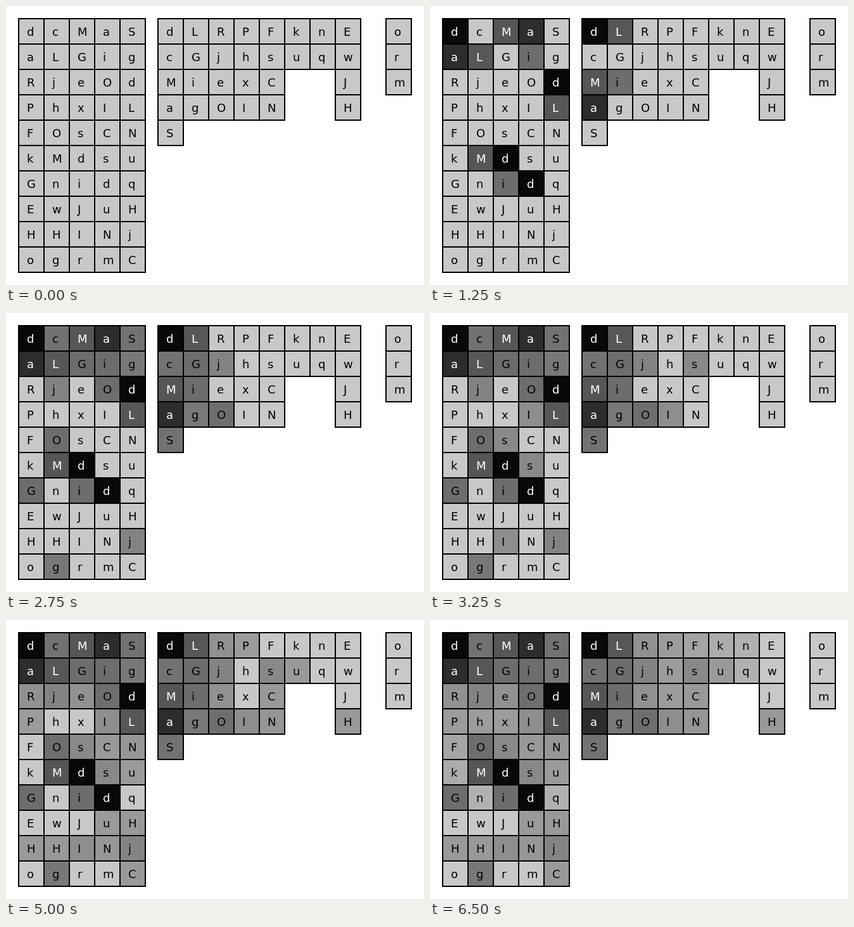
Animation, 660 px wide and 440 px high, one loop 8 s. Source, as an HTML page:

```html
<!DOCTYPE html>
<html lang="en">
<head>
<meta charset="utf-8">
<style>
  html, body { margin: 0; width: 100%; height: 100%; overflow: hidden; background: #fff; }
  svg { display: block; width: 660px; height: 440px; }
  rect { stroke: #000; stroke-width: 2; }
  text { font: 18px "DejaVu Sans", Verdana, sans-serif; }
</style>
</head>
<body>
<svg id="stage" viewBox="0 0 660 440"></svg>
<script>
const NS = 'http://www.w3.org/2000/svg';
const CELL = 40, STEP = 250, LOOP = 8000, BASE = 200;
const stage = document.getElementById('stage');

const rows = ['dcMaS', 'aLGig', 'RjeOd', 'PhxIL', 'FOsCN',
              'kMdsu', 'Gnidq', 'EwJuH', 'HHINj', 'ogrmC'];
const columns = ['dcMaS', 'LGig', 'RjeO', 'PhxI', 'FsCN', 'ku', 'nq', 'EwJH', '', 'orm'];
const order = 'daMLiGOScgjsIReNuHCPhxFkqn';

// Each row counts 0.8 times as much as the one above it.
const score = {};
rows.forEach((row, r) => {
  for (const ch of row) score[ch] = (score[ch] || 0) + 0.8 ** r;
});
const shade = ch => Math.max(0, Math.round(BASE - 86 * score[ch]));

function add(tag, attrs) {
  const el = document.createElementNS(NS, tag);
  for (const key in attrs) el.setAttribute(key, attrs[key]);
  return stage.appendChild(el);
}

const cells = [];
function addCell(ch, x, y) {
  const box = add('rect', { x, y, width: CELL, height: CELL });
  const label = add('text', { x: x + 13, y: y + 27 });
  label.textContent = ch;
  cells.push({ ch, box, label, rank: order.indexOf(ch) });
}

rows.forEach((row, r) => [...row].forEach((ch, c) => addCell(ch, 20 + c * CELL, 20 + r * CELL)));

// The lower neighbours of a gap stay where their column puts them.
columns.forEach((col, c) => [...col].forEach((ch, r) => addCell(ch, 240 + c * CELL - (c > 8 ? 0 : 0), 20 + r * CELL)));

function draw(time) {
  const done = Math.floor((time % LOOP) / STEP);
  for (const { ch, box, label, rank } of cells) {
    const g = rank >= 0 && rank < done ? shade(ch) : BASE;
    box.setAttribute('fill', `rgb(${g},${g},${g})`);
    label.setAttribute('fill', g < 100 ? '#fff' : '#000');
  }
}

const start = performance.now();
function tick() {
  draw(performance.now() - start);
  requestAnimationFrame(tick);
}
draw(0);
tick();
</script>
</body>
</html>
```
